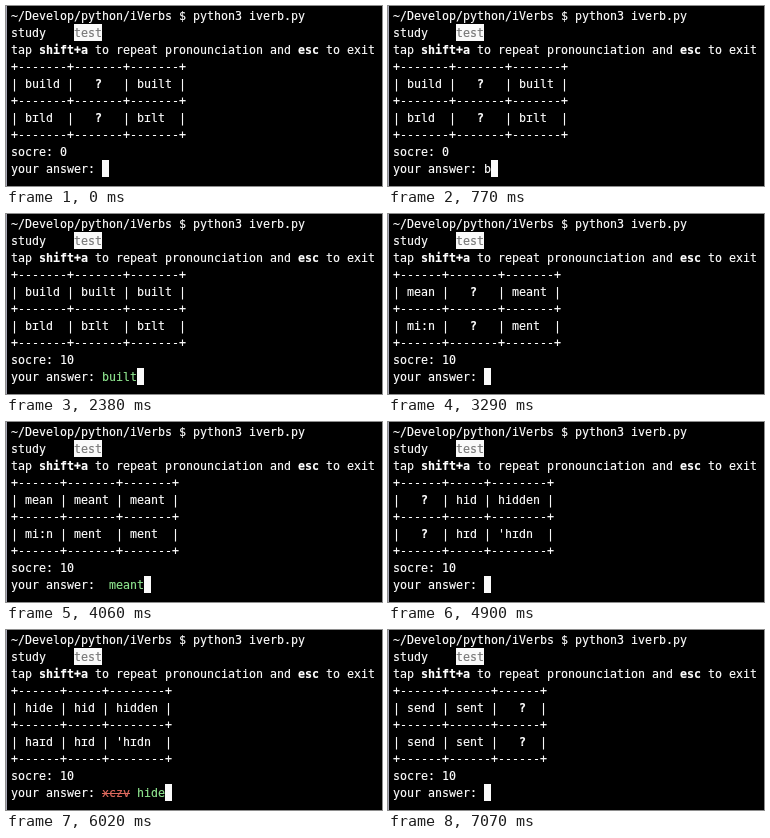
An HTML page for the animation above (7.14 s loop, 376 px wide and 180 px high).

```html
<!DOCTYPE html>
<html lang="en">
<head>
<meta charset="utf-8">
<title>iVerbs</title>
<style>
  html, body { margin: 0; width: 100%; height: 100%; overflow: hidden; background: #000; }
  #edge { position: absolute; left: 0; top: 0; width: 1px; height: 100%; background: #a8a8b6; }
  #term {
    position: absolute; left: 5px; top: 2px; margin: 0;
    font: 11.63px/17px "DejaVu Sans Mono", monospace;
    -webkit-text-stroke: 0.15px;
    color: #fff; white-space: pre; font-variant-ligatures: none;
  }
  .line { height: 17px; }
  /* blocks sit one pixel above the text line */
  .tab, .cursor {
    display: inline-block; position: relative; top: -1px;
    height: 17px; line-height: 19px; vertical-align: top; background: #fafafa;
  }
  .tab { color: #777; }
  .cursor { width: 7px; }
  .good { color: #8fe68f; }
  .bad { color: #de6a5e; text-decoration: line-through; }
</style>
</head>
<body>
<div id="edge"></div>
<div id="term"></div>
<script>
const LOOP = 7140;

const header = [
  '~/Develop/python/iVerbs $ python3 iverb.py',
  'study    <span class="tab">test</span>',
  'tap <b>shift+a</b> to repeat pronounciation and <b>esc</b> to exit',
];

// forms, transcriptions, index of the hidden form
const verbs = {
  build: [['build', 'built', 'built'], ['bɪld', 'bɪlt', 'bɪlt'], 1],
  mean: [['mean', 'meant', 'meant'], ['mi:n', 'ment', 'ment'], 1],
  hide: [['hide', 'hid', 'hidden'], ['haɪd', 'hɪd', "'hɪdn"], 0],
  send: [['send', 'sent', 'sent'], ['send', 'sent', 'sent'], 2],
};

const span = (cls, text) => `<span class="${cls}">${text}</span>`;
const wrong = (typed, right) => span('bad', typed) + ' ' + span('good', right);

// start time, verb, solved, score, answer
const steps = [
  [0, 'build', false, 0, ''],
  [770, 'build', false, 0, 'b'],
  [1050, 'build', false, 0, 'bu'],
  [1260, 'build', false, 0, 'bui'],
  [1610, 'build', false, 0, 'buil'],
  [1960, 'build', false, 0, 'built'],
  [2380, 'build', true, 10, span('good', 'built')],
  [3290, 'mean', false, 10, ''],
  [4060, 'mean', true, 10, wrong('', 'meant')],
  [4900, 'hide', false, 10, ''],
  [5320, 'hide', false, 10, 'xcz'],
  [5460, 'hide', false, 10, 'xczv'],
  [6020, 'hide', true, 10, wrong('xczv', 'hide')],
  [7070, 'send', false, 10, ''],
];

function table(verb, solved) {
  const [forms, sounds, hidden] = verbs[verb];
  const widths = forms.map(f => f.length);
  const rule = '+' + widths.map(w => '-'.repeat(w + 2)).join('+') + '+';
  const cell = (text, i) => i === hidden && !solved
    ? '  <b>?</b>' + ' '.repeat(widths[i] - 3)
    : text.padEnd(widths[i]);
  const row = words => '| ' + words.map(cell).join(' | ') + ' |';
  return [rule, row(forms), rule, row(sounds), rule];
}

function screen([, verb, solved, score, answer]) {
  return [
    ...header,
    ...table(verb, solved),
    'socre: ' + score,
    'your answer: ' + answer + span('cursor', ''),
  ].map(text => `<div class="line">${text}</div>`).join('');
}

const term = document.getElementById('term');
const screens = steps.map(screen);
let shown = -1;

function draw() {
  const t = performance.now() % LOOP;
  const now = steps.findLastIndex(step => step[0] <= t);
  if (now !== shown) {
    term.innerHTML = screens[now];
    shown = now;
  }
  requestAnimationFrame(draw);
}
draw();
</script>
</body>
</html>
```
